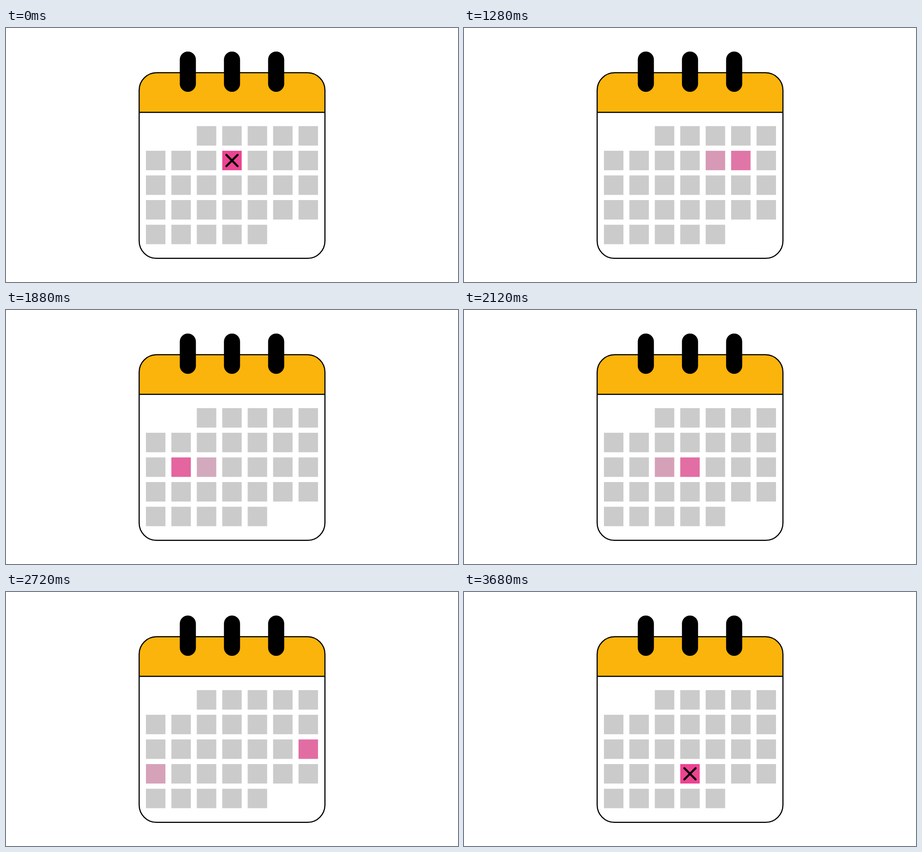
An HTML page with a canvas that plays this animation: 998x561 px, repeating every 4000 ms.

```html
<!DOCTYPE html>
<html lang="en">
<head>
<meta charset="utf-8">
<title>Calendar</title>
<style>
  html, body { margin: 0; width: 100%; height: 100%; overflow: hidden; background: #fff; }
  canvas { display: block; }
</style>
</head>
<body>
<canvas id="stage" width="998" height="561"></canvas>
<script>
const ctx = document.getElementById('stage').getContext('2d');

const LOOP = 4000, TICK = 40;
const CROSS_OFF = 680, CROSS_ON = 3680;
const MOVE_START = 1010, STEP = 166;
const FIRST_DAY = 2, LAST_DAY = 32, FROM = 10, TO = 24;
const CELL = 43;
const GREY = [203, 203, 203], PINK = [236, 68, 146];

const mix = k => `rgb(${GREY.map((g, i) => Math.round(g + (PINK[i] - g) * k))})`;

const cellPos = i => [309 + 56.15 * (i % 7), 216.7 + 54.45 * Math.floor(i / 7)];

function drawCard() {
  ctx.lineWidth = 2.5;
  ctx.strokeStyle = '#000';
  ctx.beginPath();
  ctx.roundRect(294, 98.8, 410.2, 410, 38.5);
  ctx.save();
  ctx.clip();
  ctx.fillStyle = '#fbb40b';
  ctx.fillRect(294, 98, 411, 88);
  ctx.restore();
  ctx.stroke();

  ctx.beginPath();
  ctx.moveTo(294, 186.2);
  ctx.lineTo(704, 186.2);
  ctx.stroke();

  ctx.fillStyle = '#000';
  for (const x of [401.5, 499, 596.5]) {
    ctx.beginPath();
    ctx.roundRect(x - 17.8, 52, 35.6, 89, 17.8);
    ctx.fill();
  }
}

function drawCross(i) {
  const [left, top] = cellPos(i);
  const x = left + CELL / 2, y = top + CELL / 2, r = 12.4;
  ctx.lineWidth = 4.6;
  ctx.lineCap = 'round';
  ctx.beginPath();
  ctx.moveTo(x - r, y - r);
  ctx.lineTo(x + r, y + r);
  ctx.moveTo(x + r, y - r);
  ctx.lineTo(x - r, y + r);
  ctx.stroke();
  ctx.lineCap = 'butt';
}

function draw(t) {
  ctx.fillStyle = '#fff';
  ctx.fillRect(0, 0, 998, 561);
  drawCard();

  // The highlight crossfades linearly from one day to the next.
  const day = Math.min(TO, FROM + Math.max(0, (t - MOVE_START) / STEP));
  for (let i = FIRST_DAY; i <= LAST_DAY; i++) {
    ctx.fillStyle = mix(Math.max(0, 1 - Math.abs(i - day)));
    ctx.fillRect(...cellPos(i), CELL, CELL);
  }

  if (t < CROSS_OFF) drawCross(FROM);
  else if (t >= CROSS_ON) drawCross(TO);
}

const start = performance.now();

function frame() {
  const t = (performance.now() - start) % LOOP;
  draw(Math.floor(t / TICK) * TICK);
  requestAnimationFrame(frame);
}

frame();
</script>
</body>
</html>
```
